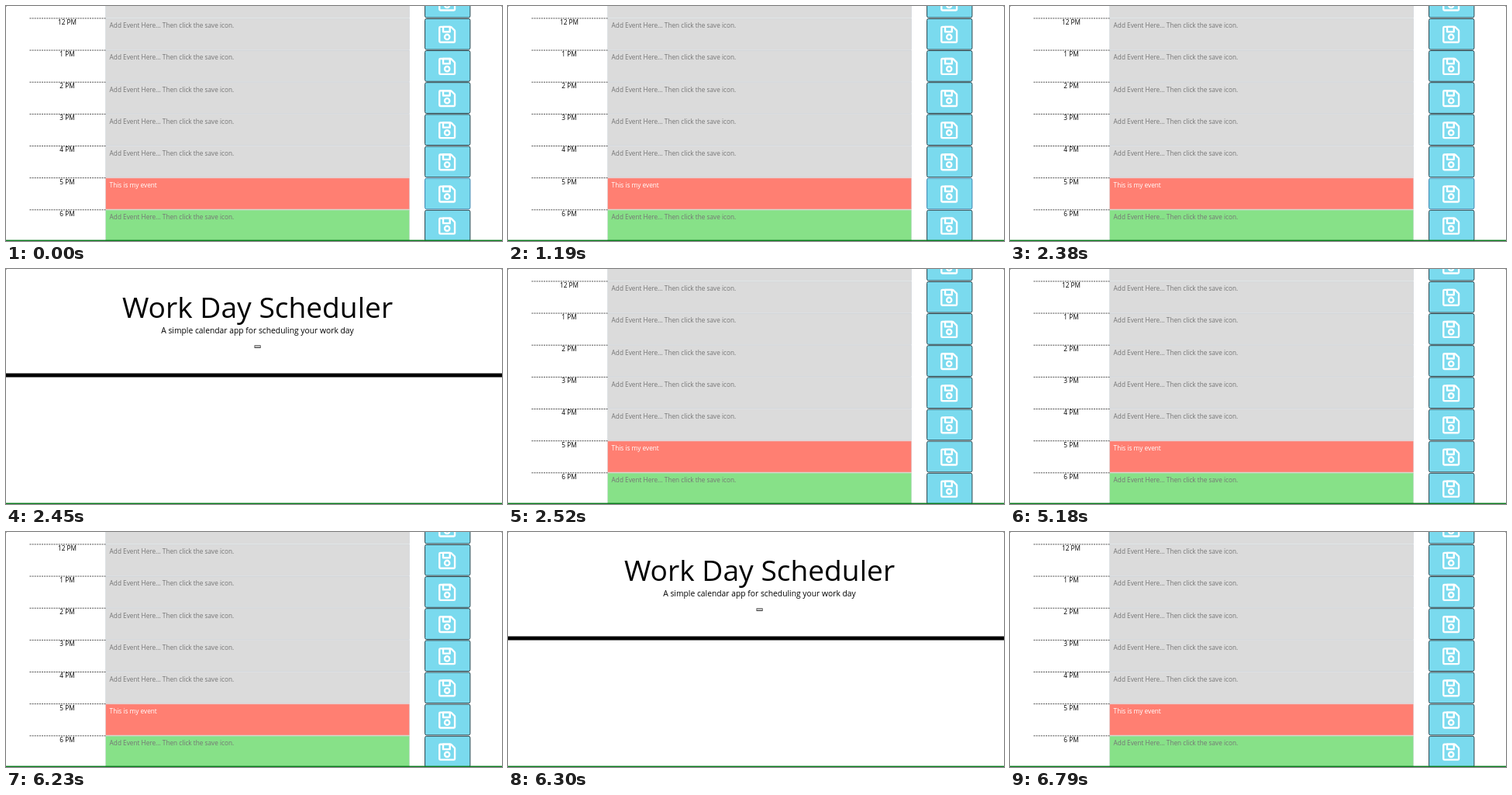
An HTML page with a canvas for the animation above (6860 ms loop, 640x303 px).

```html
<!DOCTYPE html>
<html lang="en">
<head>
<meta charset="utf-8">
<title>Day planner</title>
<style>
  html, body { margin: 0; width: 100%; height: 100%; overflow: hidden; background: #fff; }
  canvas { display: block; width: 100vw; height: 100vh; }
</style>
</head>
<body>
<canvas id="stage"></canvas>
<script>
const W = 640, H = 303;
const LOOP = 6860, RELOADS = [2450, 6300], RELOAD_TIME = 70;
const FONT = '"Open Sans", "Noto Sans", sans-serif';
const HINT = 'Add Event Here... Then click the save icon.';
const GREY = '#dbdbdb', RED = '#ff7f72', GREEN = '#87e188';
const ROW_TOP = 15.4, ROW_STEP = 41.15;

const canvas = document.getElementById('stage');
const ctx = canvas.getContext('2d');

function resize() {
  const ratio = window.devicePixelRatio || 1;
  canvas.width = Math.round(innerWidth * ratio);
  canvas.height = Math.round(innerHeight * ratio);
}

function rect(x, y, w, h, color) {
  ctx.fillStyle = color;
  ctx.fillRect(x, y, w, h);
}

function text(str, x, y, size, color, align = 'left') {
  ctx.font = `${size}px ${FONT}`;
  ctx.textAlign = align;
  ctx.fillStyle = color;
  ctx.fillText(str, x, y);
}

// Floppy disk on a 448-unit grid, centred on (cx, cy).
function saveIcon(cx, cy) {
  ctx.save();
  ctx.translate(cx, cy);
  ctx.scale(0.0495, 0.0495);
  ctx.translate(-224, -256);
  ctx.strokeStyle = '#fff';
  ctx.lineWidth = 48;
  ctx.lineJoin = 'round';
  ctx.beginPath();
  ctx.moveTo(48, 56);
  ctx.lineTo(316, 56);
  ctx.quadraticCurveTo(326, 56, 333, 63);
  ctx.lineTo(417, 147);
  ctx.quadraticCurveTo(424, 154, 424, 164);
  ctx.lineTo(424, 432);
  ctx.quadraticCurveTo(424, 456, 400, 456);
  ctx.lineTo(48, 456);
  ctx.quadraticCurveTo(24, 456, 24, 432);
  ctx.lineTo(24, 80);
  ctx.quadraticCurveTo(24, 56, 48, 56);
  ctx.closePath();
  ctx.stroke();
  ctx.strokeRect(120, 56, 176, 128);
  ctx.beginPath();
  ctx.arc(224, 320, 64, 0, Math.PI * 2);
  ctx.stroke();
  ctx.restore();
}

function saveButton(top, focused) {
  ctx.beginPath();
  ctx.roundRect(540.6, top + 1, 58.3, 39.7, 2);
  ctx.fillStyle = '#7adaee';
  ctx.fill();
  ctx.strokeStyle = focused ? '#3c83ad' : '#2b454d';
  ctx.lineWidth = 1;
  ctx.stroke();
  saveIcon(569.2, top + 21.4);
}

function row(index, label, color, event, focused) {
  const top = ROW_TOP + index * ROW_STEP;
  rect(128.5, top + 0.5, 392.2, ROW_STEP - 0.5, color);
  ctx.strokeStyle = '#ced4da';
  ctx.lineWidth = 0.5;
  ctx.strokeRect(128.75, top + 0.75, 391.7, ROW_STEP - 1);

  ctx.strokeStyle = '#222';
  ctx.lineWidth = 0.8;
  ctx.setLineDash([2, 1.1]);
  ctx.beginPath();
  ctx.moveTo(30.5, top + 0.5);
  ctx.lineTo(128.5, top + 0.5);
  ctx.stroke();
  ctx.setLineDash([]);

  text(label, 79, top + 8.4, 8.25, '#000', 'center');
  text(event || HINT, 133.6, top + 12.8, 8.25, event ? '#fff' : '#757575');
  saveButton(top, focused);
}

function schedule(focused) {
  row(-1, '11 AM', GREY);
  row(0, '12 PM', GREY);
  for (let hour = 1; hour <= 4; hour++) row(hour, `${hour} PM`, GREY);
  row(5, '5 PM', RED, 'This is my event', focused);
  row(6, '6 PM', GREEN);
}

function header() {
  text('Work Day Scheduler', 324.5, 63, 37.15, '#000', 'center');
  text('A simple calendar app for scheduling your work day', 324.5, 83, 10.32, '#000', 'center');
  rect(320.5, 98.3, 8.2, 3.7, '#444');
  rect(321.3, 99.2, 6.6, 1.7, '#d8d8d8');
  rect(0, 134.5, W, 5, '#000');
}

function draw(now) {
  const t = now % LOOP;
  const loading = RELOADS.some(at => t >= at && t < at + RELOAD_TIME);
  ctx.setTransform(canvas.width / W, 0, 0, canvas.height / H, 0, 0);
  rect(0, 0, W, H, '#fff');
  if (loading) header();
  else schedule(t < RELOADS[0]); // the first reload drops the button focus
  rect(0, 301.6, W, 1.4, '#087a1c');
  rect(0, 0, 1, 1, '#aaa');
  rect(W - 1, 0, 1, 1, '#aaa');
}

let start;
function tick(now) {
  start ??= now;
  draw(now - start);
  requestAnimationFrame(tick);
}

addEventListener('resize', resize);
resize();
draw(0);
requestAnimationFrame(tick);
</script>
</body>
</html>
```
